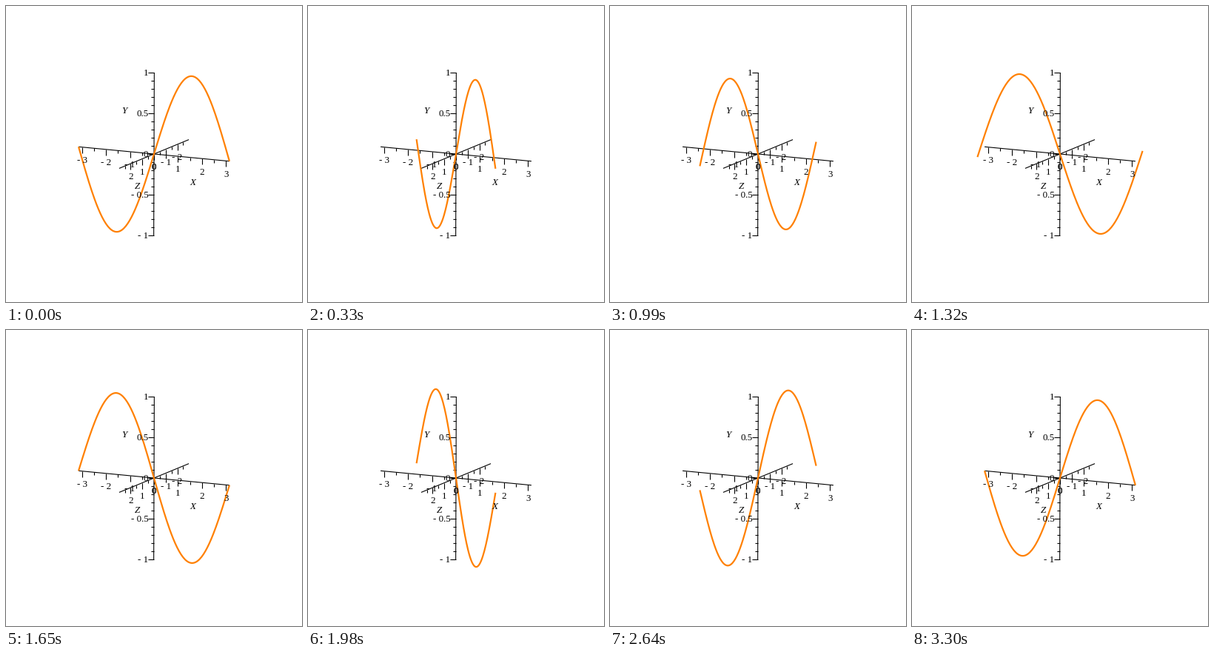
Write a matplotlib script that moves like this. It is 400 px wide and 400 px high and loops after 3630 ms.

```python
import numpy as np
import matplotlib.pyplot as plt
from matplotlib.animation import FuncAnimation
from matplotlib.collections import LineCollection

SIZE, DPI = 400, 100
PX = 72 / DPI
FRAMES, STEP_MS = 11, 330
TURN = 2 * np.pi / (FRAMES - 1)

# Screen offset of one unit along each axis (orthographic view).
ORIGIN = np.array([200.0, 200.0])
UX = np.array([32.45, 3.1])
UY = np.array([0.35, -110.0])
UZ = np.array([-15.76, 6.5])
Z_MAX = np.pi * np.sin(2 * TURN)

MAJOR, MINOR = 8, 4
LABEL_DROP = 17

plt.rcParams["axes.unicode_minus"] = False
fig = plt.figure(figsize=(SIZE / DPI, SIZE / DPI), dpi=DPI, facecolor="white")
ax = fig.add_axes([0, 0, 1, 1])
ax.set_xlim(0, SIZE)
ax.set_ylim(SIZE, 0)
ax.axis("off")


def project(x, y, z):
    return ORIGIN + np.outer(x, UX) + np.outer(y, UY) + np.outer(z, UZ)


def label(x, y, text, ha="center", style="normal"):
    ax.text(x, y + 4.4, text, family="Liberation Serif", size=13 * PX,
            style=style, ha=ha, va="baseline", color="black", zorder=4)


def number(value):
    text = f"{abs(value):g}"
    return "- " + text if value < 0 else text


def flat_axis(unit, half, top):
    """Axis with hanging ticks every half unit and whole-number labels."""
    lines = [[ORIGIN - half * unit, ORIGIN + half * unit]]
    for i in range(-2 * top - 1, 2 * top + 2):
        value = i / 2
        if abs(value) > half:
            continue
        x, y = ORIGIN + value * unit
        whole = i % 2 == 0
        lines.append([(x, y), (x, y + (MAJOR if whole else MINOR))])
        if whole:
            label(x, y + LABEL_DROP, number(value))
    return lines


def upright_axis():
    lines = [[ORIGIN - UY, ORIGIN + UY]]
    for i in range(-10, 11):
        x, y = ORIGIN + i / 10 * UY
        major = i % 5 == 0
        lines.append([(x, y), (x - (MAJOR if major else MINOR), y)])
        if major:
            label(192.3, y - 0.6, number(i / 10), ha="right")
    return lines


segments = flat_axis(UX, np.pi, 3) + flat_axis(UZ, Z_MAX, 2) + upright_axis()
ax.add_collection(LineCollection(segments, colors="black",
                                 linewidths=1.1 * PX, zorder=2))

label(252, 238, "X", style="italic")
label(160, 141, "Y", style="italic")
label(177.5, 243, "Z", style="italic")

t = np.linspace(-np.pi, np.pi, 160)
curve, = ax.plot([], [], color="#ff8000", linewidth=2.2 * PX,
                 solid_capstyle="butt", zorder=3)


def draw(i):
    angle = i * TURN
    points = project(t * np.cos(angle), np.sin(t), t * np.sin(angle))
    curve.set_data(points[:, 0], points[:, 1])
    return curve,


anim = FuncAnimation(fig, draw, frames=FRAMES, interval=STEP_MS,
                     repeat=True, repeat_delay=0)
plt.show()
```
